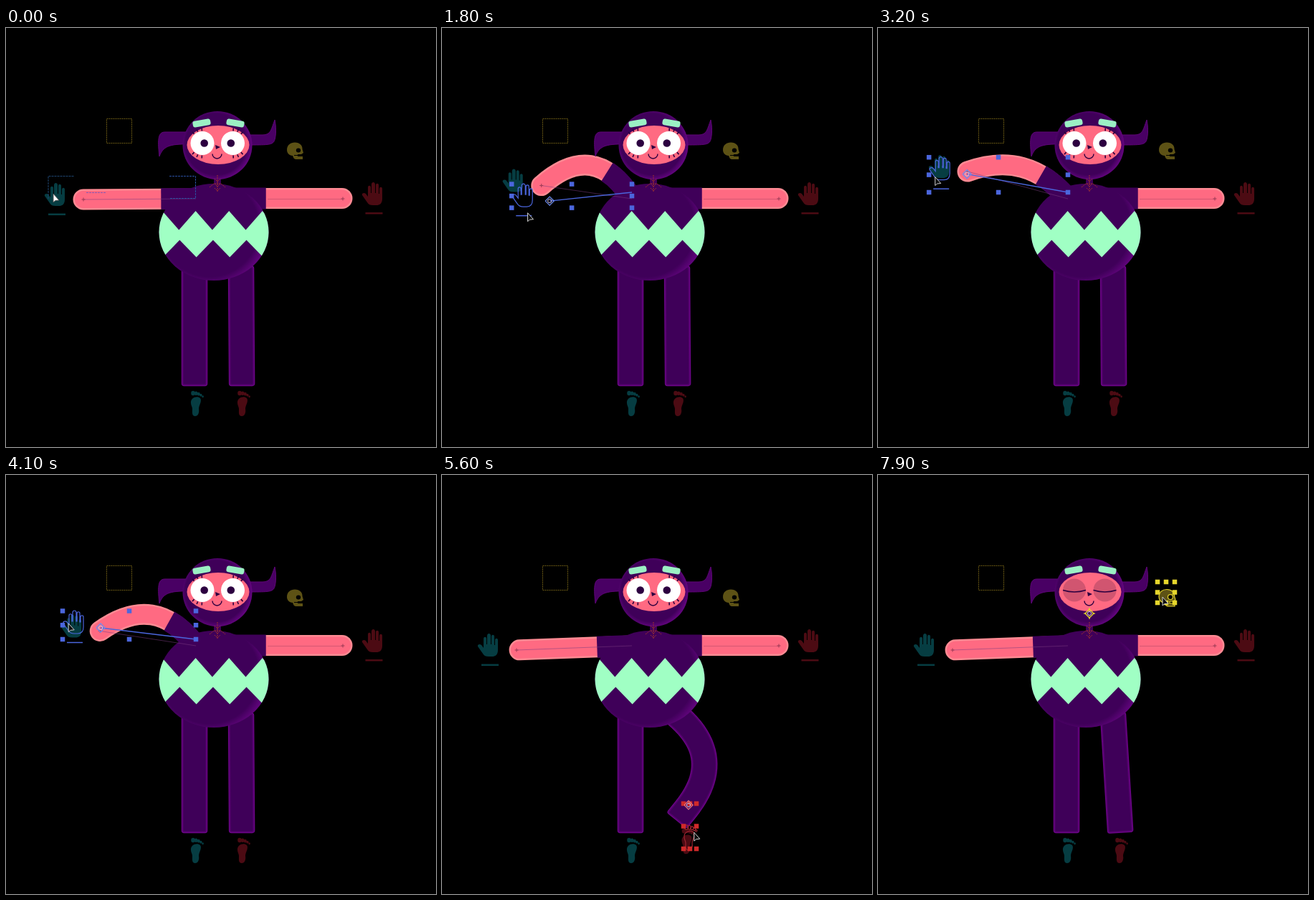
Recreate the animation shown at these times as an HTML page with a canvas. Size 600 px wide and 584 px high, loop 8 s.

```html
<!DOCTYPE html>
<html lang="en">
<head>
<meta charset="utf-8">
<title>Puppet rig</title>
<style>
html, body { margin: 0; width: 100%; height: 100%; overflow: hidden; background: #000; }
canvas { display: block; width: 600px; height: 584px; }
</style>
</head>
<body>
<canvas id="stage" width="600" height="584"></canvas>
<script>
const g = document.getElementById('stage').getContext('2d');
const LOOP = 8000, STEP = 100, TAU = Math.PI * 2;
const PURPLE = '#3f0059', RIM = '#6c0688', PINK = '#ff6a82', GLOW = '#ff8a93', MINT = '#a0ffc4', INK = '#2c0040';
const TEAL = '#063d42', RED = '#4c0b13', OLIVE = '#5d5215';
const BLUE = '#4b66dd', SCARLET = '#d02a2a', YELLOW = '#e6d62c';

// Phases of the demo
const GRAB_ARM = 1100, DROP_ARM = 4600, GRAB_FOOT = 5300, DROP_FOOT = 7100, PICK_HEAD = 7600, BLINK = 7800;
const LAG = STEP;

// Smooth curve through points evenly spaced between two times
function follow(points, from, to, t) {
  const last = points.length - 1;
  const pos = Math.min(1, Math.max(0, (t - from) / (to - from))) * last;
  const i = Math.min(last - 1, Math.floor(pos)), u = pos - i, v = 1 - u;
  const at = j => points[Math.min(last, Math.max(0, j))];
  const slope = (j, c) => (at(j + 1)[c] - at(j - 1)[c]) / (j > 0 && j < last ? 2 : 1);
  return [0, 1].map(c => at(i)[c] + (at(i + 1)[c] - at(i)[c]) * u * u * (3 - 2 * u)
    + slope(i, c) * u * v * v - slope(i + 1, c) * u * u * v);
}
const handAt = t => follow([[108, 239], [130, 207], [172, 300], [113, 270], [125, 200], [116, 250], [132, 213], [104, 244]],
  GRAB_ARM, DROP_ARM, t);
const footAt = t => follow([[329, 478], [344, 460], [338, 452], [326, 456], [312, 460], [381, 443], [337, 478]],
  GRAB_FOOT, DROP_FOOT, t);
function cursorAt(t) {
  const [hx, hy] = handAt(t + LAG), [fx, fy] = footAt(t + LAG);
  const byHand = [hx - 42, hy - 8], byFoot = [fx + 8, fy + 42];
  if (t < DROP_ARM) return byHand;
  if (t < GRAB_FOOT) return follow([byHand, byFoot], DROP_ARM, GRAB_FOOT, t);
  return follow([byFoot, [397, 170]], DROP_FOOT, PICK_HEAD, t);
}

const handShape = new Path2D('M-8 12L-15 2C-16 -1 -12 -2 -10 0L-7 4V-9C-7 -12 -3 -12 -3 -9V-1H-2V-13C-2 -17 3 -17 3 -13V-1H4V-12C4 -15 8 -15 8 -12V0H9V-7C9 -10 13 -10 13 -7V7C13 14 9 16 5 16H0C-4 16 -6 15 -8 12Z');
const footShape = new Path2D('M-7 0C-8 -8 2 -11 6 -7C9 -3 4 3 4 8C5 13 3 18 -1 18C-6 18 -5 12 -5 8C-5 5 -7 3 -7 0Z');
for (let i = 0; i < 5; i++) {
  const x = -4 + 4.4 * i - i * i / 4, y = -14 + 0.3 * i * i, r = 2.8 - 0.38 * i;
  footShape.moveTo(x + r, y);
  footShape.ellipse(x, y, r, r * 1.15, 0, 0, TAU);
}
const skullShape = new Path2D('M392 170C392 163 397 159.500 403 159.500C410 159.500 414 164 413.500 169L415 174L412 176H407V179H414V183H405C402 183 401 181 400 178C395 178 392 174 392 170Z');
const arrowShape = new Path2D('M0 0V12L3 9.500L8 9Z');
const leftHorn = new Path2D('M257 145L222 145C213 145 211 152 214 179C219 166 226 161 257 162Z');
const rightHorn = new Path2D('M336 149L358 149C370 149 370 141 375 128C378 142 376 155 374 158C371 163 365 163 335 163Z');

function place(x, y, draw, turn = 0) {
  g.save(); g.translate(x, y); g.rotate(turn); draw(); g.restore();
}
function trace(pts) {
  g.beginPath(); pts.forEach(p => g.lineTo(...p));
}
function line(color, width, ...pts) {
  g.strokeStyle = color; g.lineWidth = width;
  trace(pts); g.stroke();
}
function oval(x, y, rx, ry, fill) {
  g.fillStyle = fill; g.beginPath(); g.ellipse(x, y, rx, ry, 0, 0, TAU); g.fill();
}
function rimFill(x, y, r, from) {
  const f = g.createRadialGradient(x, y, 0, x, y, r);
  f.addColorStop(0, PURPLE); f.addColorStop(from, PURPLE); f.addColorStop(1, RIM);
  return f;
}
function fillIcon(shape, x, y, color) {
  place(x, y, () => { g.fillStyle = color; g.fill(shape); });
}
function strokeIcon(shape, x, y, color) {
  place(x, y, () => { g.strokeStyle = color; g.lineWidth = 1.2; g.stroke(shape); });
}
function bar(x, y, color) { g.fillStyle = color; g.fillRect(x - 12, y - 1, 24, 2.5); }

// Fixed-length hose: a quadratic curve that bows as its ends come closer
function hose(a, end, length, side, bow) {
  const dx = end[0] - a[0], dy = end[1] - a[1], full = Math.hypot(dx, dy);
  const c = Math.min(full, length), nx = -dy / full, ny = dx / full;
  const b = [a[0] + dx / full * c, a[1] + dy / full * c];
  const h = 2 * bow * side * Math.sqrt(3 * c * (length - c) / 8);
  return { a, b, k: [(a[0] + b[0]) / 2 + nx * h, (a[1] + b[1]) / 2 + ny * h] };
}
function curve({ a, k, b }, width, color, cap) {
  g.strokeStyle = color; g.lineWidth = width; g.lineCap = cap;
  g.beginPath(); g.moveTo(...a); g.quadraticCurveTo(...k, ...b); g.stroke();
  g.lineCap = 'butt';
}
function arm(a, end, length) {
  const h = hose(a, end, length, 1, 1), u = 0.31;
  const mix = (p, q) => p.map((v, i) => v + (q[i] - v) * u);
  const near = mix(h.a, h.k);
  curve(h, 29, GLOW, 'round');
  curve(h, 24, PINK, 'round');
  curve({ a: h.a, k: near, b: mix(near, mix(h.k, h.b)) }, 30, PURPLE, 'butt');
}
function leg(hip, end) {
  const { a, k, b } = hose(hip, end, 143, -1, 1.3);
  const left = [], right = [], half = 14.5, n = 24, ankle = 17.5;
  for (let i = 0; i <= n + 1; i++) {
    const u = Math.min(i / n, 1), v = 1 - u, extra = i > n ? ankle : 0;
    const [tx, ty] = [0, 1].map(c => v * (k[c] - a[c]) + u * (b[c] - k[c]));
    const s = Math.hypot(tx, ty), ex = tx / s, ey = ty / s;
    const [x, y] = [0, 1].map(c => v * v * a[c] + 2 * u * v * k[c] + u * u * b[c] + extra * [ex, ey][c]);
    left.push([x - ey * half, y + ex * half]);
    right.unshift([x + ey * half, y - ex * half]);
  }
  trace(left.concat(right));
  g.closePath();
  g.lineJoin = 'round';
  [[RIM, 7.5], ['#54006d', 5], [PURPLE, 1.5]].forEach(([color, w]) => {
    g.strokeStyle = color; g.lineWidth = w; g.stroke();
  });
  g.fillStyle = PURPLE; g.fill();
  g.lineJoin = 'miter';
}

function body() {
  g.beginPath(); g.ellipse(290, 284.5, 76.5, 67.5, 0, 0, TAU);
  g.fillStyle = rimFill(284, 278, 86, 0.8); g.fill();
  g.save(); g.clip();
  const top = [], bottom = [];
  for (let i = -1; i < 8; i++) {
    const x = 218 + 23.3 * i, valley = i % 2 !== 0;
    top.push([x, valley ? 281.5 : 255]);
    bottom.unshift([x + 1, valley ? 295.5 : 319.5]);
  }
  trace(top.concat(bottom));
  g.fillStyle = MINT; g.fill();
  g.restore();
}

function eye(x, y, side, shut) {
  if (shut) {
    oval(x, y, 16, 16, '#d15570');
    g.strokeStyle = INK; g.lineWidth = 1.5;
    g.beginPath(); g.moveTo(x - 16, y); g.quadraticCurveTo(x, y + 5, x + 16, y); g.stroke();
    return;
  }
  for (const deg of [48, 68, 88, -48, -68, -88]) place(x, y, () => {
    line(INK, 1.6, [side * 17, 0], [side * 21, 0]);
  }, deg * TAU / 360);
  oval(x, y, 16.5, 16.5, '#fff');
  oval(x - 2.7 * side, y, 5.3, 5.3, INK);
}

function head(shut) {
  g.fillStyle = PURPLE; g.fillRect(290, 205, 10, 16);
  for (const horn of [leftHorn, rightHorn]) {
    g.fillStyle = '#490064'; g.fill(horn);
    g.strokeStyle = '#5e0676'; g.lineWidth = 1; g.stroke(horn);
  }
  oval(295, 163.5, 48.5, 47.5, rimFill(293, 162, 52, 0.82));
  oval(296, 163, 43.5, 27, PINK);
  eye(274, 160.5, -1, shut);
  eye(316.5, 160.5, 1, shut);
  g.fillStyle = INK;
  trace([[292, 163], [299, 166], [293, 169]]); g.fill();
  g.strokeStyle = INK; g.lineWidth = 1.4;
  g.beginPath(); g.arc(294.5, 175.5, 6.5, 0, Math.PI); g.stroke();
  for (const side of [-1, 1]) place(296.5 + 23.5 * side, 132.5, () => {
    g.fillStyle = '#9bf0c4'; g.beginPath(); g.roundRect(-12.5, -4.5, 25, 9, 3); g.fill();
  }, 0.17 * side);
}

function dot(x, y) {
  const c = '#9c3a55';
  line(c, 1, [x - 2.5, y], [x + 2.5, y]); line(c, 1, [x, y - 2.5], [x, y + 2.5]);
}
function neckRig() {
  const c = '#a3342e';
  g.setLineDash([2, 1]);
  line(c, 1, [295, 205], [295, 228]);
  for (const y of [212, 219, 225]) line(c, 1, [291, y - 2], [295, y + 2], [299, y - 2]);
  line(c, 1, [284, 222], [290, 217], [300, 217], [306, 222]);
  g.setLineDash([]);
}
function diamond(x, y, color) {
  line(color, 1.3, [x - 6, y], [x, y - 6], [x + 6, y], [x, y + 6], [x - 6, y]);
  g.strokeStyle = '#d0c8e8'; g.lineWidth = 1;
  g.beginPath(); g.arc(x, y, 2.6, 0, TAU); g.stroke();
}
function handles(x0, y0, x1, y1, color, size = 6.5) {
  g.fillStyle = color;
  for (let i = 0; i < 9; i++) if (i !== 4)
    g.fillRect(x0 + (x1 - x0) * (i % 3) / 2 - size / 2, y0 + (y1 - y0) * (i / 3 | 0) / 2 - size / 2, size, size);
}
function hoverBox() {
  g.setLineDash([3, 1]);
  line('#1f4672', 1, [59, 238], [59, 206.5], [95, 206.5]);
  line('#2a4fa0', 1, [228, 206.5], [264.5, 206.5], [264.5, 237.5], [228, 237.5]);
  line('#8a58b0', 1, [112, 229.5], [140, 229.5]);
  g.setLineDash([]);
}
function armSelection([x, y]) {
  line(BLUE, 1.3, [x, y], [265, 229]);
  strokeIcon(handShape, x - 37, y - 8, BLUE);
  line(BLUE, 1.5, [x - 47, y + 20.5], [x - 25, y + 20.5]);
  diamond(x, y, '#6d8cf0');
  handles(x - 53, Math.min(y - 23.5, 229), 265, Math.max(y + 9.5, 229), BLUE);
}
function footSelection([x, y]) {
  strokeIcon(footShape, x + 1, y + 45, '#a02430');
  handles(x - 7, y - 2, x + 11, y + 61, SCARLET);
  diamond(x, y, '#e07078');
}
function skull(selected) {
  g.fillStyle = OLIVE; g.fill(skullShape);
  oval(408, 170.5, 3.2, 3, '#000');
  line('#000', 1, [402, 177.5], [413, 177.5]);
  if (!selected) return;
  g.strokeStyle = YELLOW; g.lineWidth = 1.2; g.stroke(skullShape);
  g.beginPath(); g.arc(408, 170, 3.5, 0, TAU); g.stroke();
  handles(390, 149, 414, 178, YELLOW);
  diamond(295, 193, YELLOW);
  for (let i = 0; i < 4; i++)
    place(295, 193, () => line(YELLOW, 1.2, [4, 0], [8, 0]), i * TAU / 4);
}

function draw(t) {
  const hand = handAt(t - LAG), foot = footAt(t - LAG);
  g.fillStyle = '#000'; g.fillRect(0, 0, 600, 584);

  g.setLineDash([2, 1]);
  g.strokeStyle = '#6b5a14'; g.lineWidth = 1; g.strokeRect(140.5, 126.5, 35, 34);
  g.setLineDash([]);
  fillIcon(handShape, hand[0] - 39, hand[1] - 7, TEAL);
  const handMoving = t - LAG > GRAB_ARM && t - LAG < DROP_ARM;
  if (!handMoving) bar(hand[0] - 37, hand[1] + 20.5, TEAL);
  fillIcon(handShape, 512, 231, RED);
  bar(513.5, 258, RED);
  fillIcon(footShape, 265, 523, TEAL);

  leg([263, 335], [263, 478]);
  leg([328, 335], foot);
  fillIcon(footShape, foot[0] + 1, foot[1] + 45, RED);
  arm([265, 238], hand, 157);
  arm([315, 237.5], [469, 237.5], 154);
  body();
  head(t >= BLINK);
  neckRig();

  line('#b0486888', 1, [365, 238.5], [470, 238.5]);
  dot(470, 238);
  line('#7a3c8088', 1, hand, [265, 238]);
  dot(...hand);

  if (t < GRAB_ARM) hoverBox();
  else if (t <= DROP_ARM) armSelection(handAt(t));
  if (t >= GRAB_FOOT && t <= DROP_FOOT) footSelection(footAt(t));
  skull(t >= PICK_HEAD);

  const hovering = t < GRAB_ARM;
  place(...cursorAt(t), () => {
    g.fillStyle = hovering ? '#fff' : '#101010'; g.fill(arrowShape);
    g.strokeStyle = hovering ? '#555' : '#ccc'; g.lineWidth = 1; g.stroke(arrowShape);
  });
}

const begin = performance.now();
function tick() {
  const t = (performance.now() - begin) % LOOP;
  draw(Math.floor(t / STEP) * STEP);
  requestAnimationFrame(tick);
}
tick();
</script>
</body>
</html>
```
